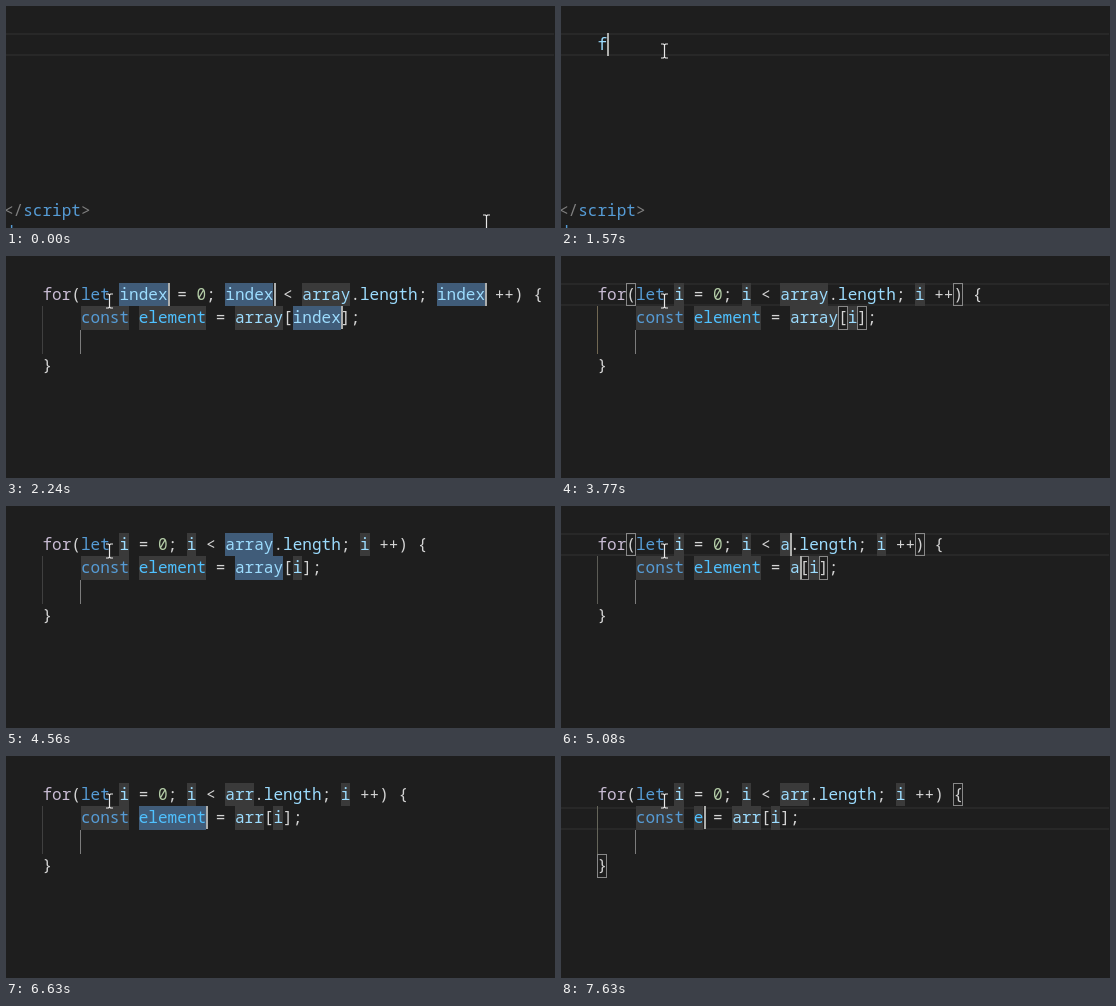
These frames come from a looping animation (549x222 px, 8000 ms). An HTML page:

```html
<!DOCTYPE html>
<html lang="en">
<head>
<meta charset="utf-8">
<title>Loop snippet</title>
<style>
  html, body { margin: 0; width: 100%; height: 100%; overflow: hidden; background: #1e1e1e; }
  #stage {
    position: relative; width: 549px; height: 222px; overflow: hidden;
    font: 16.04px/23.75px "Noto Sans Mono", "DejaVu Sans Mono", monospace;
    font-variant-ligatures: none; color: #d4d4d4; white-space: pre;
  }
  #stage > *, .row { position: absolute; left: 0; top: 0; }
  .row { height: 23.75px; }
  .row span { display: inline-block; position: relative; height: 23.75px; vertical-align: top; }
  #stage > #current { width: 548px; height: 23px; box-sizing: border-box; border: solid #282828; border-width: 2px 0; }
  .guide { width: 1px; }
  .kw { color: #c9bcd4; }
  .decl, .tag { color: #569cd6; }
  .var { color: #9cdcfe; }
  .name { color: #4fc1ff; }
  .num { color: #b5cea8; }
  .angle { color: #808080; }
  .field { background: #3a3a3a; }
  .selected { background: #405c79; }
  .match { box-shadow: inset 0 0 0 1px #888; }
  .caret::after {
    content: ""; position: absolute; left: 100%; top: 0; margin-left: .3px;
    width: 2px; height: 23px; background: #aeafad; z-index: 1;
  }
  #stage > #popup {
    left: 36px; top: 50px; width: 537px; height: 190px; box-sizing: border-box;
    background: #252526; border: 1px solid #454545;
  }
  #popup div { padding-left: 28px; }
  #popup div:first-child { background: #062f4a; }
  #popup b { font-weight: normal; color: #0097fb; }
</style>
</head>
<body>
<div id="stage">
  <div id="current"></div>
  <div id="code"></div>
  <div id="popup"></div>
  <svg id="mouse" width="9" height="17" viewBox="-4.5 -8.5 9 17">
    <path d="M-3.5 -7H-1L0 -6L1 -7H3.5M0 -6V6M-3.5 7H-1L0 6L1 7H3.5" fill="none" stroke="#e8e8e8" stroke-width="1.2"/>
  </svg>
</div>
<script>
const LOOP = 8000, LEFT = -2, TOP = 26.5, LINE = 23.75, COL = 9.624;
const $ = id => document.getElementById(id);

// Each step changes only the listed properties.
const steps = [
  [0, { typed: '', caret: false, line: 0 }],
  [300, { caret: true }],
  [800, { caret: false }],
  [1300, { caret: true }],
  [1570, { typed: 'f' }],
  [1630, { typed: 'fo' }],
  [1760, { typed: 'for', popup: true }],
  [2240, { popup: false, loop: true, i: 'index', arr: 'array', el: 'element',
           active: 'i', selected: true, match: '', line: -1, guide: '#404040' }],
  [2710, { caret: false }],
  [3240, { caret: true }],
  [3310, { i: 'i', selected: false, match: '()[]', line: 0, guide: '#716853' }],
  [3770, { caret: false }],
  [4100, { active: 'arr', selected: true, caret: true, match: '', line: -1, guide: '#404040' }],
  [4560, { caret: false }],
  [5020, { caret: true }],
  [5080, { arr: 'a', selected: false, match: '()[]', line: 0, guide: '#5c5c56' }],
  [5230, { arr: 'ar' }],
  [5290, { arr: 'arr' }],
  [5820, { caret: false }],
  [6300, { caret: true }],
  [6560, { active: 'el', selected: true, caret: true, match: '', line: -1 }],
  [6630, { guide: '#404040' }],
  [7020, { caret: false }],
  [7500, { caret: true }],
  [7570, { el: 'e', selected: false, line: 1 }],
  [7630, { match: '{}', guide: '#65655a' }]
];
let previous = {};
const states = steps.map(([at, change]) => previous = { ...previous, ...change, at });

const escapeText = text => text.replace(/&/g, '&amp;').replace(/</g, '&lt;');
const span = (text, cls = '') => `<span class="${cls}">${escapeText(text)}</span>`;
const row = (line, col, html, shift = 0) =>
  `<div class="row" style="left:${LEFT + col * COL}px;top:${TOP + line * LINE + shift}px">${html}</div>`;
const guide = (x, y, height, color) =>
  `<div class="row guide" style="left:${x}px;top:${y}px;height:${height}px;background:${color}"></div>`;

function loopCode(s) {
  const field = (key, cls) => {
    const active = key === s.active;
    return span(s[key], `${cls} field${active && s.selected ? ' selected' : ''}${active && s.caret ? ' caret' : ''}`);
  };
  const bracket = ch => span(ch, s.match.includes(ch) ? 'match' : '');
  const i = field('i', 'var'), arr = field('arr', 'var');
  const head = span('for', 'kw') + bracket('(') + span('let', 'decl') + span(' ') + i +
    span(' = ') + span('0', 'num') + span('; ') + i + span(' < ') + arr + span('.') +
    span('length', 'var') + span('; ') + i + span(' ++') + bracket(')') + span(' ') + bracket('{');
  const body = span('const', 'decl field') + span(' ') + field('el', 'name') + span(' = ') +
    arr + bracket('[') + i + bracket(']') + span(';');
  return guide(36, 50, 48, s.guide) + guide(74, 74, 24, '#7c7c7c') +
    row(0, 4, head) + row(1, 8, body) + row(3, 4, bracket('}'));
}

const closingTag = name => span('</', 'angle') + span(name, 'tag') + span('>', 'angle');
const blankCode = s =>
  row(0, 4, span(s.typed, 'var' + (s.caret ? ' caret' : ''))) +
  row(7, 0, closingTag('script')) + row(8, -4, closingTag('body'), -2);

$('popup').innerHTML = ['', 'each', 'in', 'of', 'Each', ' await', 'mat']
  .map(rest => `<div><b>for</b>${rest}</div>`).join('');

// The pointer advances in discrete ticks along an eased diagonal.
function placeMouse(t) {
  const tick = t < 70 ? 0 : Math.min(12, Math.floor((t - 70) / 75.5) + 1);
  const p = tick / 12, e = p * p * (3 - 2 * p);
  $('mouse').style.transform = `translate(${476 - 377 * e}px, ${207.5 - 171 * e}px)`;
}

let shown = null;
function draw(now) {
  const t = now % LOOP;
  const s = states.findLast(state => state.at <= t);
  if (s !== shown) {
    shown = s;
    $('code').innerHTML = s.loop ? loopCode(s) : blankCode(s);
    $('popup').style.display = s.popup ? 'block' : 'none';
    $('current').style.display = s.line < 0 ? 'none' : 'block';
    $('current').style.top = Math.round(27 + s.line * LINE) + 'px';
  }
  placeMouse(t);
}

const start = performance.now();
function frame() {
  draw(performance.now() - start);
  requestAnimationFrame(frame);
}
frame();
</script>
</body>
</html>
```
